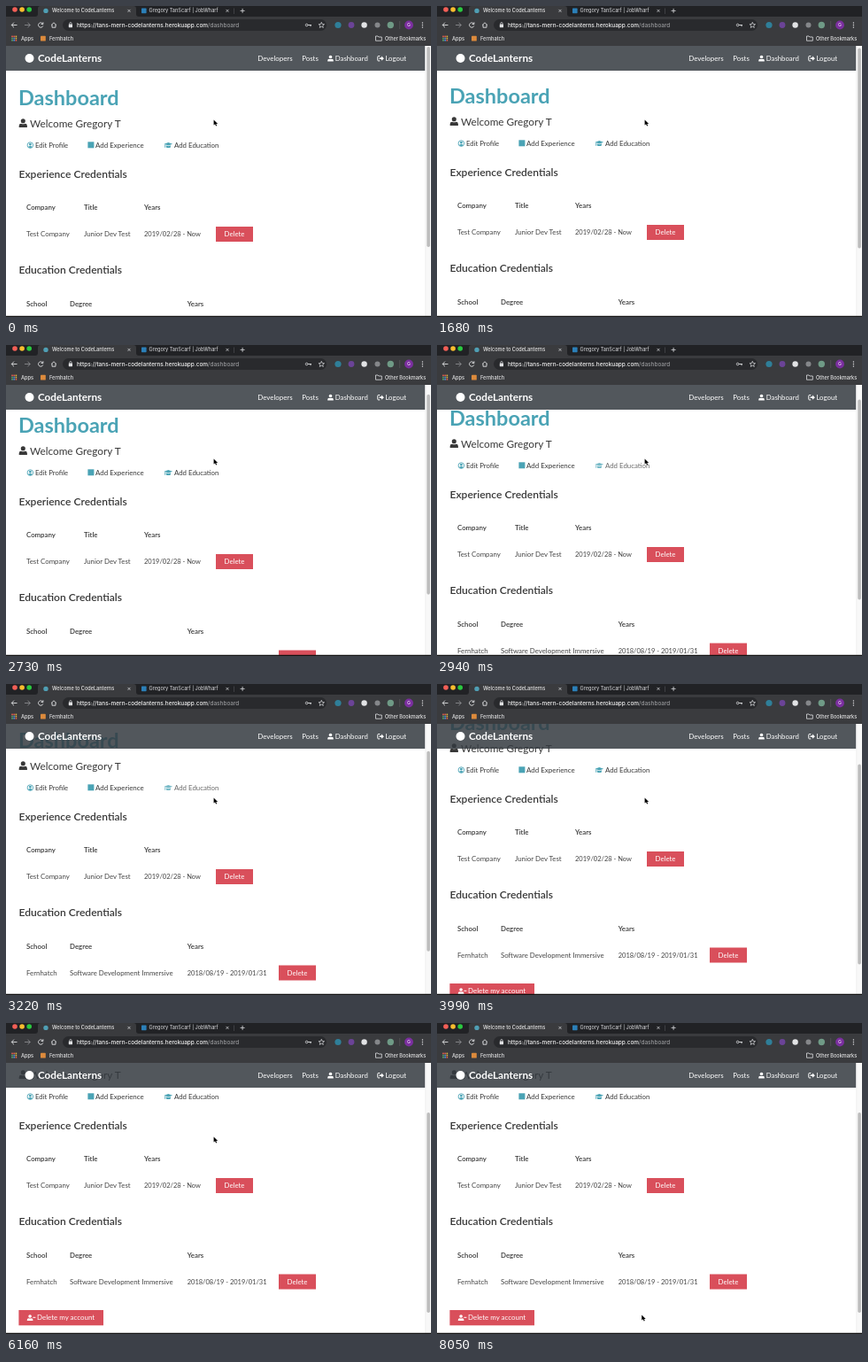
Write an HTML page that moves like this. It is 480 px wide and 351 px high and loops after 8.12 s.

```html
<!DOCTYPE html>
<html lang="en">
<head>
<meta charset="utf-8">
<title>Dashboard</title>
<style>
  html, body { margin: 0; width: 100%; height: 100%; overflow: hidden; background: #fff; }
  svg { display: block; width: 100vw; height: 100vh; }
  text { white-space: pre; }
  .page { font-family: Lato, "Open Sans", sans-serif; }
  .chrome { font-family: Inter, Roboto, sans-serif; }
</style>
</head>
<body>
<svg id="stage" viewBox="0 0 480 351">
  <defs>
    <clipPath id="view"><rect y="45" width="480" height="306"/></clipPath>
    <g id="user">
      <circle cx="5" cy="2.7" r="2.6"/>
      <path d="M0.3 10V8.3Q0.3 5.8 2.8 5.8Q5 7 7.2 5.8Q9.7 5.8 9.7 8.3V10Z"/>
    </g>
    <g id="badge">
      <circle cx="4" cy="4" r="3.4" fill="none" stroke="currentColor" stroke-width=".9"/>
      <circle cx="4" cy="3.1" r="1.4"/>
      <path d="M1.6 6.3Q2 4.9 4 4.9T6.4 6.3Q4 8 1.6 6.3Z"/>
    </g>
    <g id="cap">
      <path d="M0 2.6L4.8 .8L9.6 2.6L4.8 4.4Z"/>
      <path d="M2.2 4V6.2Q4.8 7.6 7.4 6.2V4L4.8 5Z"/>
      <path d="M1 3V6.6" stroke="currentColor" stroke-width=".7"/>
    </g>
    <g id="exit">
      <path d="M3 .8H1.2Q.5 .8 .5 1.5V5.5Q.5 6.2 1.2 6.2H3" fill="none" stroke="currentColor"/>
      <path d="M2.4 2.6H4.7V.9L7.6 3.5L4.7 6.1V4.4H2.4Z"/>
    </g>
  </defs>
  <g clip-path="url(#view)">
    <rect y="45" width="480" height="306" fill="#fff"/>
    <g id="content" class="page"></g>
    <g id="nav" class="page"></g>
    <rect x="473.5" y="45" width="6.5" height="306" fill="#f8f8f8"/>
    <path d="M473.8 45V351" stroke="#e8e8e8" stroke-width=".6"/>
    <rect id="thumb" x="475.3" y="46" width="3.6" height="226" rx="1.8" fill="#bdbdbd"/>
  </g>
  <g id="browser" class="chrome"></g>
  <path d="M0 350.4H480" stroke="#111" stroke-width="1.2"/>
  <path id="pointer" d="M0 0V6.2L1.5 4.9L2.5 7.1L3.6 6.6L2.6 4.5H4.5Z"
        fill="#000" stroke="#fff" stroke-width=".6" paint-order="stroke"/>
</svg>
<script>
const LOOP = 8120, STEP = 70;
const INK = '#383838', TEAL = '#4aa3b5', RED = '#d94f5b', PALE = '#dfe0e2';
const $ = id => document.getElementById(id);

function add(parent, tag, attrs, label) {
  const el = document.createElementNS('http://www.w3.org/2000/svg', tag);
  for (const key in attrs) el.setAttribute(key, attrs[key]);
  if (label) el.textContent = label;
  parent.appendChild(el);
  return el;
}
// y is the middle of the capitals
const write = (parent, x, y, size, label, fill = INK, weight = 400) =>
  add(parent, 'text', { x, y: y + size * 0.35, 'font-size': size, fill, 'font-weight': weight }, label);
const box = (parent, x, y, width, height, fill, rx = 0) =>
  add(parent, 'rect', { x, y, width, height, fill, rx });
const dot = (parent, cx, cy, r, fill) => add(parent, 'circle', { cx, cy, r, fill });
const line = (parent, d, stroke = PALE, width = 0.9) =>
  add(parent, 'path', { d, stroke, 'stroke-width': width, fill: 'none' });
const icon = (parent, name, x, y, color, scale = 1) =>
  add(parent, 'use', { href: '#' + name, transform: `translate(${x} ${y}) scale(${scale})`, fill: color, color });

function drawBrowser(g) {
  box(g, 0, 0, 480, 45, '#3a3b3e');
  box(g, 0, 0, 480, 12, '#212225');
  add(g, 'path', { d: 'M33 12Q36 12 36 9V3Q36 0 39 0H144Q147 0 147 3V9Q147 12 150 12Z', fill: '#3a3b3e' });
  ['#f35f57', '#f8bd2e', '#2ac940'].forEach((c, i) => dot(g, 10 + i * 8.1, 4, 2.8, c));
  dot(g, 45, 5.4, 2.7, '#4f9fb4');
  write(g, 52, 5.4, 5.55, 'Welcome to CodeLanterns', '#e8e8e8', 500);
  box(g, 153, 2.6, 5.6, 5.6, '#2b7fb8', 0.6);
  write(g, 161.5, 5.4, 5.55, 'Gregory TanScarf | JobWharf', '#c4c5c8', 500);
  for (const x of [139, 250]) line(g, `M${x - 1.5} 3.9l3 3m0 -3l-3 3`, PALE, 0.7);
  line(g, 'M257.5 2.5V9', '#55565a', 0.6);
  line(g, 'M264.6 5.4h5M267.1 2.9v5', PALE, 0.8);

  line(g, 'M12.5 21.5H6.3M9 18.7L6.2 21.5L9 24.3');
  line(g, 'M21 21.5H27.2M24.5 18.7L27.3 21.5L24.5 24.3', '#8a8b8e');
  line(g, 'M41.6 20.2A2.7 2.7 0 1 0 41.8 22.4M41.9 18.3V20.5H39.7');
  line(g, 'M51 21.6L54 18.8L57 21.6M52 21V24.2H56V21');
  box(g, 64, 15, 298, 13, '#292a2d', 6.5);
  box(g, 70.8, 20.6, 4.2, 3.6, PALE, 0.4);
  line(g, 'M71.7 20.8V19.7Q71.7 18.5 72.9 18.5T74.1 19.7V20.8', PALE, 0.7);
  const url = write(g, 80, 21.4, 6.45, '', '#f1f1f1', 500);
  add(url, 'tspan', {}, 'https://tans-mern-codelanterns.herokuapp.com');
  add(url, 'tspan', { fill: '#96979a' }, '/dashboard');
  add(g, 'circle', { cx: 339.6, cy: 21.5, r: 1.3, fill: 'none', stroke: PALE, 'stroke-width': 0.8 });
  line(g, 'M341 21.5H345M344 21.5V23.2');
  const star = Array.from({ length: 10 }, (_, i) => {
    const a = i * Math.PI / 5 - Math.PI / 2, r = i % 2 ? 1.5 : 3.4;
    return `${356.3 + r * Math.cos(a)},${21.7 + r * Math.sin(a)}`;
  }).join(' ');
  add(g, 'polygon', { points: star, fill: 'none', stroke: PALE, 'stroke-width': 0.7 });

  dot(g, 375, 21.5, 3.6, '#2f7f99');
  dot(g, 390, 21.5, 3.4, '#6b4397');
  dot(g, 404.6, 21.5, 3.2, '#e2e3e5');
  dot(g, 419.5, 21.5, 3, '#85878a');
  dot(g, 434.3, 21.5, 3.7, '#6f9a86');
  line(g, 'M444.7 17V26', '#606164', 0.6);
  dot(g, 455, 21.5, 4.9, '#7b2fa0');
  write(g, 453, 21.5, 5.2, 'G', '#fff');
  for (const y of [19, 21.5, 24]) dot(g, 470.4, y, 0.7, PALE);

  const apps = ['#e8604f', '#e8604f', '#e6b840', '#58a968', '#4f8fe0', '#e6b840', '#58a968', '#4f8fe0', '#e8604f'];
  apps.forEach((c, i) => box(g, 6.2 + i % 3 * 2.2, 33.6 + Math.floor(i / 3) * 2.2, 1.6, 1.6, c));
  write(g, 17, 36.6, 5.65, 'Apps', '#e4e4e5', 500);
  box(g, 39, 33.8, 5.8, 5.8, '#dc8a3c', 0.7);
  write(g, 49, 36.6, 5.65, 'Fernhatch', '#e4e4e5', 500);
  add(g, 'path', { d: 'M417.5 34H420L420.9 35H424.3V39.2H417.5Z', fill: 'none', stroke: PALE, 'stroke-width': 0.8 });
  write(g, 428, 36.6, 5.55, 'Other Bookmarks', '#e4e4e5', 500);
}

function drawNav(g) {
  box(g, 0, 45, 473.5, 28, 'rgba(52,58,64,.85)');
  dot(g, 26.5, 59, 5, '#fff');
  write(g, 36, 59, 11.7, 'CodeLanterns', '#fff', 700);
  write(g, 284.3, 59.2, 7.9, 'Developers', '#fff');
  write(g, 334.2, 59.2, 7.9, 'Posts', '#fff');
  icon(g, 'user', 363, 55.6, '#fff', 0.7);
  write(g, 371.8, 59.2, 7.75, 'Dashboard', '#fff');
  icon(g, 'exit', 419.3, 55.7, '#fff');
  write(g, 428.4, 59.2, 7.8, 'Logout', '#fff');
}

function drawTable(g, y, title, columns, headers, cells, buttonX) {
  write(g, 14.5, y, 12.05, title, INK, 600);
  columns.forEach((x, i) => {
    write(g, x, y + 38, 7.85, headers[i], INK, 600);
    write(g, x, y + 68, i === 2 ? 7.5 : 7.85, cells[i], '#454545');
  });
  box(g, buttonX, y + 59.5, 42, 17, RED);
  write(g, buttonX + 9.5, y + 67.8, 7.85, 'Delete', '#fff');
}

function drawContent(g) {
  write(g, 14, 103, 23.5, 'Dashboard', TEAL, 700);
  icon(g, 'user', 14.4, 126.6, INK, 0.98);
  write(g, 27, 132.4, 11.75, 'Welcome Gregory T');
  icon(g, 'badge', 23.5, 152.7, TEAL, 0.97);
  write(g, 33, 156.7, 7.75, 'Edit Profile');
  box(g, 92.4, 152.8, 7, 7, TEAL);
  write(g, 101, 156.7, 7.95, 'Add Experience');
  const education = add(g, 'g', {});
  icon(education, 'cap', 178.5, 152.7, TEAL);
  write(education, 190, 156.7, 7.85, 'Add Education');
  drawTable(g, 189, 'Experience Credentials', [23, 88, 156],
    ['Company', 'Title', 'Years'], ['Test Company', 'Junior Dev Test', '2019/02/28 - Now'], 237);
  drawTable(g, 297.5, 'Education Credentials', [23, 72, 204.7],
    ['School', 'Degree', 'Years'], ['Fernhatch', 'Software Development Immersive', '2018/08/19 - 2019/01/31'], 308);
  box(g, 14.4, 397.5, 95.6, 17.3, RED);
  icon(g, 'user', 23.6, 402.6, '#fff', 0.7);
  line(g, 'M30.4 405.8H33.4', '#fff', 1);
  write(g, 35, 406.1, 7.95, 'Delete my account', '#fff');
  return education;
}

// start, end, from, to, steepness
const scrolls = [
  [1400, 2170, 0, 12, 3.5],
  [2590, 3430, 12, 41.5, 3],
  [3500, 4340, 41.5, 71.5, 1.5],
  [4690, 5250, 71.5, 74, 2]
];
const progress = (t, start, end) => Math.min(1, Math.max(0, (t - start) / (end - start)));
const ease = (p, n) => p < 0.5 ? (2 * p) ** n / 2 : 1 - (2 - 2 * p) ** n / 2;
const scrollAt = t => Math.round(scrolls.reduce((sum, [start, end, from, to, n]) =>
  sum + (to - from) * ease(progress(t, start, end), n), 0));

drawBrowser($('browser'));
drawNav($('nav'));
const education = drawContent($('content'));

function render(now) {
  const t = Math.floor(now % LOOP / STEP) * STEP;
  const scroll = scrollAt(t);
  const move = ease(progress(t, 7280, 8050), 2);
  $('content').setAttribute('transform', `translate(0 ${0.5 - scroll})`);
  $('thumb').setAttribute('y', 46 + scroll * 0.743);
  $('pointer').setAttribute('transform', `translate(${234.6 - 3.4 * move} ${128.4 + 201 * move})`);
  education.setAttribute('opacity', t >= 2940 && t < 3290 ? 0.75 : 1);
}

const begin = performance.now();
function tick() {
  render(performance.now() - begin);
  requestAnimationFrame(tick);
}
tick();
</script>
</body>
</html>
```
